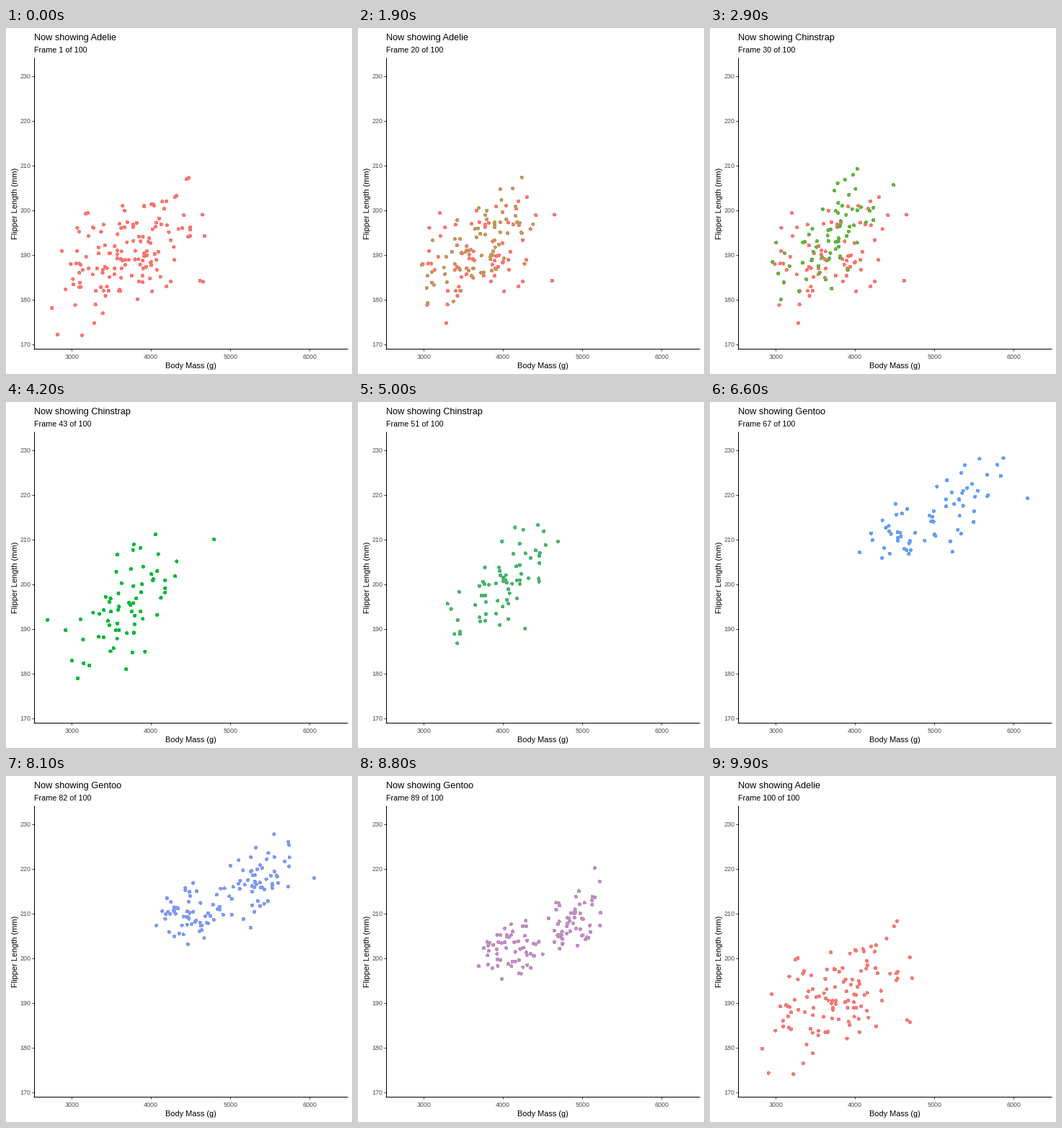
These frames come from a looping animation (480 px wide and 480 px high, 10000 ms). A matplotlib script:

```python
import numpy as np
import matplotlib.pyplot as plt
from matplotlib.animation import FuncAnimation

plt.rcParams["font.family"] = ["Liberation Sans", "DejaVu Sans"]
SIZE, DPI, FRAMES = 480, 72, 100
rng = np.random.default_rng(8)


def sample(n, mass, flipper, mass_gap, flipper_gap, mass_sd, flipper_sd, rho):
    """Correlated (g, mm) rows; females and males alternate around the mean."""
    sex = np.where(np.arange(n) % 2, 0.5, -0.5)
    u, v = np.clip(rng.normal(size=(2, n)), -2.1, 2.1)
    g = mass + mass_gap * sex + mass_sd * u
    mm = flipper + flipper_gap * sex + flipper_sd * (rho * u + np.sqrt(1 - rho**2) * v)
    measured = np.column_stack([np.round(g / 25) * 25, np.round(mm)])
    return measured + rng.uniform(-0.4, 0.4, (n, 2)) * (25, 1)


adelie = sample(146, 3706, 190.1, 660, 4.5, 300, 6.1, 0.3)
chinstrap = sample(68, 3733, 195.8, 410, 8, 310, 5.6, 0.45)
gentoo = sample(119, 5092, 217.2, 800, 8.5, 290, 4.6, 0.35)

# Rows that hold the extreme birds of each species.
adelie[:5] = [(3136, 172), (4400, 196), (3100, 186), (3800, 189), (4660, 184)]
chinstrap[:5] = [(3800, 193), (2700, 192), (4800, 210), (3690, 181), (3600, 195)]
gentoo[:5] = [(5050, 215), (5350, 208), (4350, 208), (6300, 221), (5400, 220)]


def stage(g, mm):
    """Data units to stage pixels."""
    return 90.3 + (g - 3000) * 0.11, 438.3 - (mm - 170) * 6.2


# Colours blend in CIE Lab.
TO_XYZ = np.array([[0.4124, 0.3576, 0.1805], [0.2126, 0.7152, 0.0722],
                   [0.0193, 0.1192, 0.9505]])
WHITE = TO_XYZ.sum(axis=1)


def to_lab(hex_code):
    c = np.array([int(hex_code[i:i + 2], 16) for i in (1, 3, 5)]) / 255
    lin = np.where(c > 0.04045, ((c + 0.055) / 1.055) ** 2.4, c / 12.92)
    x, y, z = np.cbrt(TO_XYZ @ lin / WHITE)
    return np.array([116 * y - 16, 500 * (x - y), 200 * (y - z)])


def to_rgb(lab):
    y = (lab[0] + 16) / 116
    f = np.array([y + lab[1] / 500, y, y - lab[2] / 200])
    lin = np.clip(np.linalg.solve(TO_XYZ, f ** 3 * WHITE), 0, 1)
    return np.where(lin > 0.0031308, 1.055 * lin ** (1 / 2.4) - 0.055, 12.92 * lin)


STATES = [("Adelie", adelie, to_lab("#F8766D")),
          ("Chinstrap", chinstrap, to_lab("#00BA38")),
          ("Gentoo", gentoo, to_lab("#619CFF"))]
MOVES = [(11, 33), (45, 67), (79, 100)]


def pose(i):
    """Species name, dot positions and dot colours at step i."""
    k = next(k for k, (_, end) in enumerate(MOVES) if i < end)
    start, end = MOVES[k]
    name, a, lab_a = STATES[k]
    next_name, b, lab_b = STATES[(k + 1) % 3]
    t = max(0, (i - start) / (end - start))
    # Paired rows travel; spare rows wait, or appear on arrival.
    n = min(len(a), len(b))
    xy = np.concatenate([a[n:], a[:n] + (b[:n] - a[:n]) * t])
    colors = np.concatenate([np.tile(to_rgb(lab_a), (len(a) - n, 1)),
                             np.tile(to_rgb(lab_a + (lab_b - lab_a) * t), (n, 1))])
    return (next_name if t > 0.5 else name), xy, colors


fig = plt.figure(figsize=(SIZE / DPI, SIZE / DPI), dpi=DPI, facecolor="white")
ax = fig.add_axes([0, 0, 1, 1])
ax.set_xlim(-0.5, SIZE - 0.5)
ax.set_ylim(SIZE - 0.5, -0.5)
ax.axis("off")


def line(x, y, color="black"):
    ax.plot(x, y, color=color, lw=1, solid_capstyle="butt", snap=True)


def label(x, y, s, size, color="black", **kw):
    return ax.text(x, y, s, fontsize=size, color=color, **kw)


for mass in range(3000, 7000, 1000):
    x, _ = stage(mass, 170)
    line([x, x], [444.5, 447.5], "#333333")
    label(x + 0.4, 458.5, mass, 8.9, "#4D4D4D", ha="center")
for length in range(170, 240, 10):
    _, y = stage(3000, length)
    line([35, 38], [y, y], "#333333")
    label(34, y + 3.4, length, 8.9, "#4D4D4D", ha="right")
line([38, 38], [40.5, 444.5])
line([37.5, 473.5], [444, 444])

label(255.5, 472, "Body Mass (g)", 11, ha="center")
label(13, 242.5, "Flipper Length (mm)", 11, rotation=90, ha="center", va="center")
title = label(38.5, 17, "", 12.8)
subtitle = label(38.5, 34, "", 10.7)
dots = ax.scatter([], [], s=17, linewidths=0, zorder=3, antialiaseds=False)


def update(i):
    name, rows, colors = pose(i)
    title.set_text(f"Now showing {name}")
    subtitle.set_text(f"Frame {i + 1} of {FRAMES}")
    dots.set_offsets(np.column_stack(stage(*rows.T)))
    dots.set_facecolors(colors)
    return title, subtitle, dots


anim = FuncAnimation(fig, update, frames=FRAMES, interval=100, repeat=True,
                     repeat_delay=0, blit=False)
plt.show()
```
